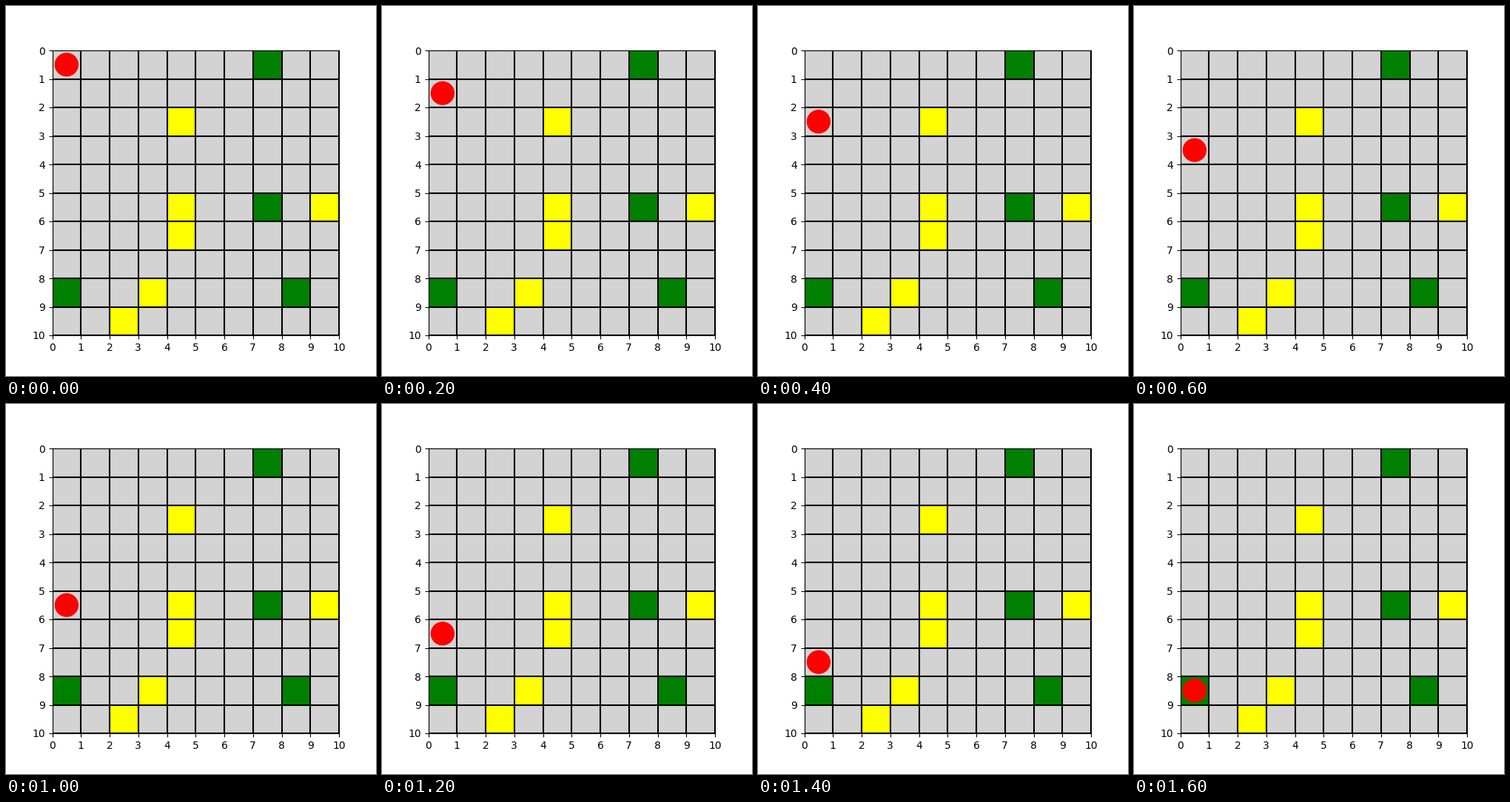
A matplotlib script that plays this animation: 500 by 500 pixels, repeating every 1800 ms.

```python
import matplotlib.pyplot as plt
from matplotlib.animation import FuncAnimation
from matplotlib.patches import Circle, Rectangle

SIZE = 10
STEPS = 9
CELLS = {
    "yellow": [(4, 2), (4, 5), (4, 6), (9, 5), (3, 8), (2, 9)],
    "green": [(7, 0), (7, 5), (0, 8), (8, 8)],
}

fig, ax = plt.subplots(figsize=(5, 5), dpi=100)
fig.subplots_adjust(left=0.125, right=0.9, bottom=0.11, top=0.88)
ax.set_facecolor("lightgray")
ax.set_xlim(0, SIZE)
ax.set_ylim(SIZE, 0)
ax.set_xticks(range(SIZE + 1))
ax.set_yticks(range(SIZE + 1))

for color, places in CELLS.items():
    for place in places:
        ax.add_patch(Rectangle(place, 1, 1, facecolor=color, linewidth=0))

for i in range(SIZE + 1):
    ax.plot([0, SIZE], [i, i], color="black", linewidth=1.5)
    ax.plot([i, i], [0, SIZE], color="black", linewidth=1.5)

agent = ax.add_patch(Circle((0.5, 0.5), 0.4, color="red", zorder=3))


def update(step):
    """Move the agent one cell down per step."""
    agent.center = (0.5, step + 0.5)
    return [agent]


anim = FuncAnimation(fig, update, frames=STEPS, interval=200,
                     repeat=True, repeat_delay=0, blit=False)
plt.show()
```
